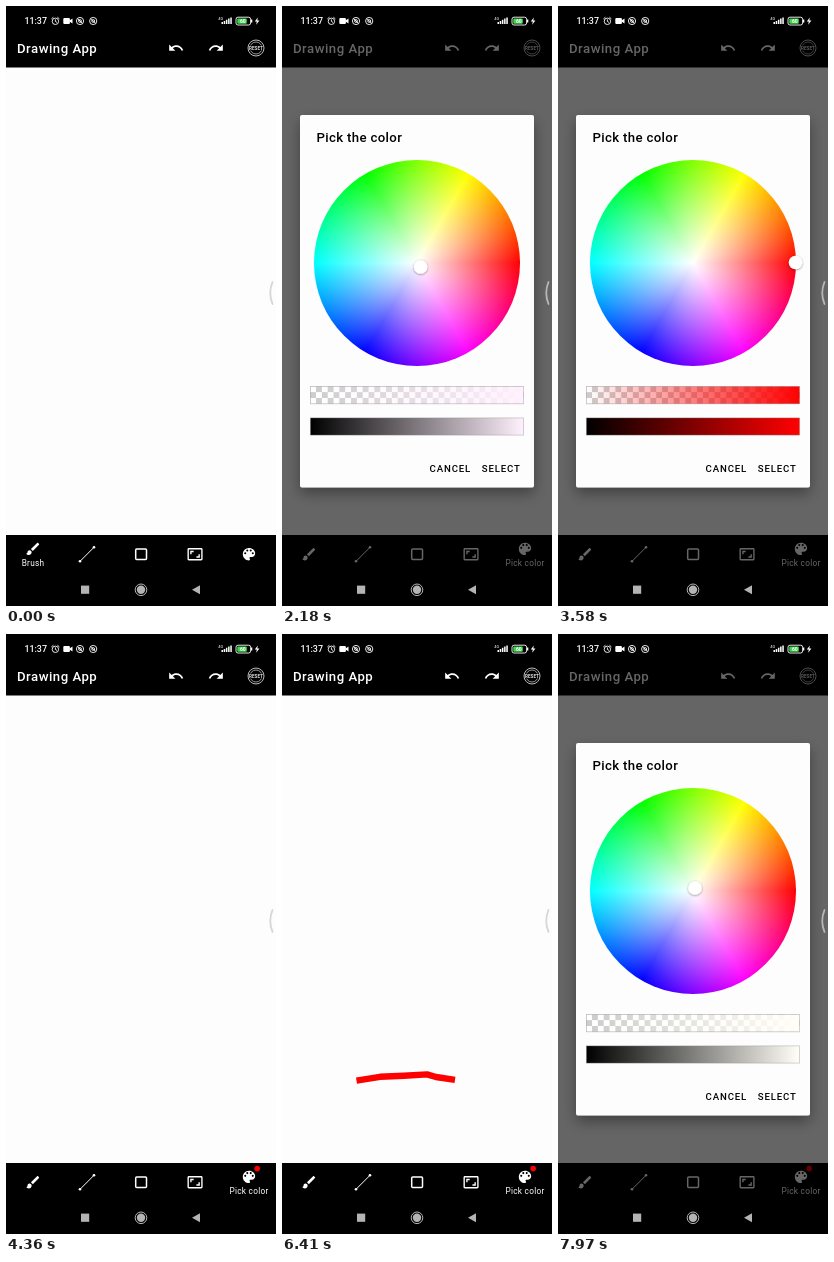
An HTML page for the animation above (8000 ms loop, 270 by 600 pixels).

```html
<!DOCTYPE html>
<html lang="en">
<head>
<meta charset="utf-8">
<title>Drawing App</title>
<style>
  html, body { margin: 0; width: 100%; height: 100%; overflow: hidden; background: #000; }
  svg { display: block; width: 270px; height: 600px; font-family: Roboto, sans-serif; }
  .title { font-size: 13.2px; font-weight: 500; letter-spacing: .34px; }
  .button { font-size: 9.62px; font-weight: 500; letter-spacing: .86px; }
  .label { font-size: 8.25px; letter-spacing: .275px; text-anchor: middle; fill: #fff; }
  .line { fill: none; stroke: #fff; }
  #wheel {
    width: 206px; height: 206px; border-radius: 50%;
    background: radial-gradient(closest-side, #fff, #fff0),
      conic-gradient(from 90deg, red, magenta, blue, cyan, lime, yellow, red);
  }
</style>
</head>
<body>
<svg id="stage" viewBox="0 0 270 600">
  <defs>
    <path id="undo" d="M12.5 8c-2.65 0-5.05.99-6.9 2.6L2 7v9h9l-3.62-3.62c1.39-1.16 3.16-1.88 5.12-1.88 3.54 0 6.55 2.31 7.6 5.5l2.37-.78C21.08 11.03 17.15 8 12.5 8z"/>
    <linearGradient id="fade">
      <stop stop-color="var(--pick)" stop-opacity="0"/>
      <stop offset="1" stop-color="var(--pick)"/>
    </linearGradient>
    <linearGradient id="shade">
      <stop stop-color="#000"/>
      <stop offset="1" stop-color="var(--pick)"/>
    </linearGradient>
    <pattern id="checker" x="28.2" y="380.3" width="11.67" height="11.67" patternUnits="userSpaceOnUse">
      <path fill="#ccc" d="M0 0H12V12H0z"/>
      <path fill="#fff" d="M0 0H5.83V11.67H11.67V5.83H0z"/>
    </pattern>
    <filter id="shadow" x="-30%" y="-30%" width="160%" height="160%">
      <feDropShadow dx="0" dy="6" stdDeviation="7" flood-opacity=".36"/>
    </filter>
    <filter id="softShadow" x="-50%" y="-50%" width="200%" height="200%">
      <feDropShadow dx="0" dy=".7" stdDeviation="1" flood-opacity=".45"/>
    </filter>
  </defs>

  <rect width="270" height="600"/>
  <rect y="61.5" width="270" height="467.5" fill="#fdfdfd"/>
  <path id="stroke" d="M74.5 446.6L98 442.8 122 441.7 145 440.4 154 443 173 445.8" pathLength="1"
    stroke-dasharray="1 2" fill="none" stroke="#f00" stroke-width="6.4" stroke-linejoin="round"/>

  <!-- App bar -->
  <g fill="#fff">
    <text class="title" x="11" y="47.4" style="letter-spacing:.5px">Drawing App</text>
    <use href="#undo" transform="translate(161.8 33.8) scale(.687)"/>
    <use href="#undo" transform="translate(218.2 33.8) scale(-.687 .687)"/>
  </g>
  <g fill="none" stroke="#bbb">
    <circle cx="250" cy="42" r="8"/>
    <circle cx="250" cy="42" r="6" stroke-width=".8"/>
    <path d="M243 42h14" stroke="#000" stroke-width="5"/>
    <text x="250" y="43.6" font-size="4.6" font-weight="700" text-anchor="middle" fill="#ddd" stroke="none">RESET</text>
  </g>

  <!-- Bottom bar -->
  <g fill="#fff">
    <g id="brush"><path d="M7 14c-1.66 0-3 1.34-3 3 0 1.31-1.16 2-2 2 .92 1.22 2.49 2 4 2 2.21 0 4-1.79 4-4 0-1.66-1.34-3-3-3zm13.71-9.37l-1.34-1.34c-.39-.39-1.02-.39-1.41 0L9 12.25 11.75 15l8.96-8.96c.39-.39.39-1.02 0-1.41z"/></g>
    <g id="palette"><path d="M12 3c-4.97 0-9 4.03-9 9s4.03 9 9 9c.83 0 1.5-.67 1.5-1.5 0-.39-.15-.74-.39-1.01-.23-.26-.38-.61-.38-.99 0-.83.67-1.5 1.5-1.5H16c2.76 0 5-2.24 5-5 0-4.42-4.03-8-9-8zm-5.5 9a1.5 1.5 0 1 1 0-3 1.5 1.5 0 0 1 0 3zm3-4a1.5 1.5 0 1 1 0-3 1.5 1.5 0 0 1 0 3zm5 0a1.5 1.5 0 1 1 0-3 1.5 1.5 0 0 1 0 3zm3 4a1.5 1.5 0 1 1 0-3 1.5 1.5 0 0 1 0 3z"/></g>
    <path transform="translate(180.8 540) scale(.687)" d="M19 12h-2v3h-3v2h5v-5zM7 9h3V7H5v5h2V9zm14-6H3c-1.1 0-2 .9-2 2v14c0 1.1.9 2 2 2h18c1.1 0 2-.9 2-2V5c0-1.1-.9-2-2-2zm0 16.01H3V4.99h18v14.02z"/>
    <circle cx="74" cy="555.3" r="1.3"/>
    <circle cx="88" cy="541.3" r="1.3"/>
  </g>
  <path class="line" d="M74 555.3L88 541.3"/>
  <rect class="line" x="129.7" y="543" width="10.8" height="10.6" rx="1" stroke-width="1.5"/>
  <text id="brushLabel" class="label" x="27">Brush</text>
  <text id="paletteLabel" class="label" x="243">Pick color</text>
  <circle id="dot" cx="251.2" cy="534.6" r="2.8" fill="#f00"/>

  <!-- Colour dialog -->
  <rect id="barrier" width="270" height="567"/>
  <g id="dialog">
    <rect x="18" y="109" width="234" height="372.5" rx="2" fill="#fdfdfd" filter="url(#shadow)"/>
    <text class="title" x="34.5" y="136">Pick the color</text>
    <foreignObject x="32" y="153.5" width="206" height="206"><div id="wheel"></div></foreignObject>
    <rect x="28" y="380" width="214" height="18" fill="url(#checker)"/>
    <g stroke="#888" stroke-opacity=".45" stroke-width=".8">
      <rect x="28.4" y="380.4" width="213.2" height="17.4" fill="url(#fade)"/>
      <rect x="28.4" y="411.9" width="213.2" height="17.2" fill="url(#shade)"/>
    </g>
    <circle id="thumb" r="6.8" fill="#fff" filter="url(#softShadow)"/>
    <text class="button" x="147.6" y="466.2">CANCEL</text>
    <text class="button" x="199.8" y="466.2">SELECT</text>
  </g>

  <!-- System overlays -->
  <path d="M266.5 276Q262 287 266.5 298" fill="none" stroke="#ccc" stroke-opacity=".8" stroke-width="1.8" stroke-linecap="round"/>
  <g fill="#fff">
    <text x="18.4" y="18.2" font-size="8.9" font-weight="500">11:37</text>
    <rect x="57.3" y="12" width="6.6" height="6" rx="1"/>
    <path d="M63.5 14.6L66.5 12.5V17.6L63.5 15.5z"/>
    <text x="212.3" y="14" font-size="4">4G</text>
    <path d="M215.5 16h1.5v2h-1.5zM217.7 15h1.5v3h-1.5zM219.9 13.8h1.5v4.2h-1.5zM222.1 12.6h1.5v5.4h-1.5zM224.3 11.5h1.5v6.5h-1.5z"/>
    <path d="M245 13.6h1.3v3H245zM251.8 11.4L248.8 15.6H250.8L250.2 18.8 253.4 14.4H251.3z"/>
  </g>
  <g class="line" stroke-width=".9">
    <circle cx="49.4" cy="15.3" r="3.2"/>
    <path d="M49.4 13.4V15.5L51 16.4M45.4 12.9L47.4 11.2M53.4 12.9L51.4 11.2"/>
    <g id="badge">
      <circle cx="74" cy="15" r="3.6"/>
      <circle cx="74" cy="15" r="1.4"/>
      <path d="M71.6 12.6L76.4 17.4"/>
    </g>
    <use href="#badge" x="13.2"/>
    <rect x="230" y="11.2" width="14.6" height="7.8" rx="2"/>
  </g>
  <rect x="231.3" y="12.5" width="9.5" height="5.2" rx="1" fill="#3fd84c"/>
  <text x="234" y="17" font-size="5" font-weight="700" fill="#fff">60</text>
  <g fill="#b4b4b4">
    <rect x="75" y="579.6" width="8.2" height="8.2"/>
    <circle cx="135" cy="583.8" r="4.2"/>
    <circle cx="135" cy="583.8" r="5.8" fill="none" stroke="#b4b4b4"/>
    <path d="M194 579.2V588.2L186 583.7z"/>
  </g>
</svg>
<script>
  const LOOP = 8000, CENTER = { x: 135, y: 256.5 }, RADIUS = 103;
  const el = id => document.getElementById(id);
  const progress = (t, start, length) => Math.min(1, Math.max(0, (t - start) / length));
  const easeOut = p => 1 - (1 - p) ** 2;
  const easeInOut = p => p * p * (3 - 2 * p);
  const mix = (a, b, p) => a + (b - a) * p;

  // Thumb positions as [time, x, y]
  const drag = [
    [2100, 135, 256.5], [2180, 138.5, 261], [2500, 172, 259], [2900, 237.5, 256.5],
    [5000, 237.5, 256.5], [5000, 135, 256.5], [7850, 135, 256.5], [7960, 137, 254]
  ];

  function thumbAt(t) {
    const next = drag.findIndex(([time]) => time > t);
    if (next === 0) return drag[0].slice(1);
    if (next < 0) return drag.at(-1).slice(1);
    const [t0, x0, y0] = drag[next - 1], [t1, x1, y1] = drag[next];
    const p = progress(t, t0, t1 - t0);
    return [mix(x0, x1, p), mix(y0, y1, p)];
  }

  // A selected tab lifts its icon and brings up its label
  function drawTab(id, x, selected) {
    const drop = 5.3 * (1 - selected), label = el(id + 'Label');
    el(id).setAttribute('transform', `translate(${x} ${542.9 + drop}) scale(.687) translate(-12 -12)`);
    label.setAttribute('y', 560.4 + drop);
    label.style.opacity = selected;
  }

  function draw(t) {
    const tab = easeOut(progress(t, 1400, 200));
    drawTab('brush', 27, 1 - tab);
    drawTab('palette', 243, tab);

    const open = t < 5000
      ? progress(t, 1478, 150) - progress(t, 3720, 150)
      : progress(t, 7108, 150);
    el('dialog').style.opacity = easeOut(open);
    el('barrier').style.opacity = .6 * easeInOut(open);

    const [x, y] = thumbAt(t), dx = x - CENTER.x, dy = CENTER.y - y;
    const hue = Math.atan2(dy, dx) * 180 / Math.PI;
    const saturation = Math.min(1, Math.hypot(dx, dy) / RADIUS);
    el('thumb').setAttribute('transform', `translate(${x} ${y})`);
    el('stage').style.setProperty('--pick', `hsl(${hue} 100% ${100 - 50 * saturation}%)`);

    el('dot').style.opacity = t >= 3760 ? 1 : 0;
    const drawn = progress(t, 5000, 1380);
    el('stroke').style.strokeDashoffset = 1 - drawn;
    el('stroke').style.opacity = drawn ? 1 : 0;
  }

  const start = performance.now();
  function tick() {
    draw((performance.now() - start) % LOOP);
    requestAnimationFrame(tick);
  }
  tick();
</script>
</body>
</html>
```
